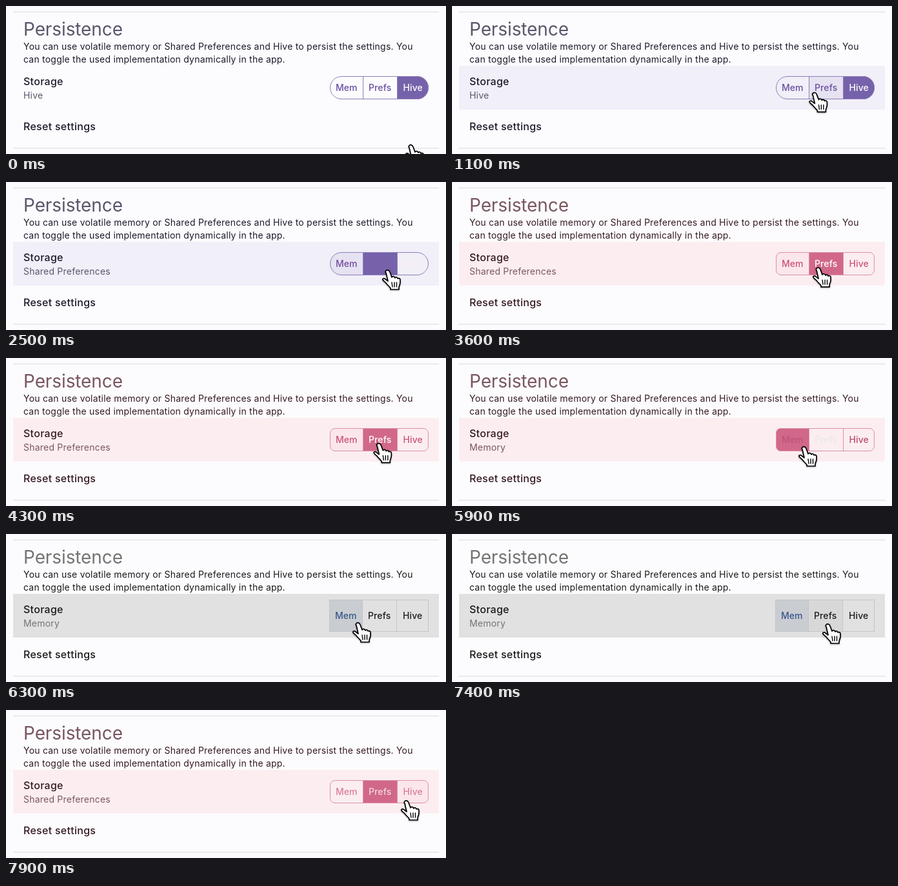
An HTML page for the animation above (8 s loop, 682 by 230 pixels).

```html
<!DOCTYPE html>
<html lang="en">
<head>
<meta charset="utf-8">
<title>Persistence</title>
<style>
  html, body { margin: 0; width: 100%; height: 100%; overflow: hidden; background: #fcfcfe; }
  svg { display: block; font-family: Inter, sans-serif; }
  .head { font-size: 28px; letter-spacing: -.1px; fill: var(--muted); }
  .body { font-size: 14px; letter-spacing: .22px; fill: var(--text); }
  .sub { fill: var(--muted); }
  .title { font-size: 16px; font-weight: 500; letter-spacing: .28px; fill: var(--text); }
  .label { font-size: 14px; font-weight: 500; letter-spacing: .1px; text-anchor: middle; }
  .rule { fill: #e5e4ea; }
  .tile { fill: var(--tile); }
  .line { fill: none; stroke: var(--border); }
  #cursor { filter: drop-shadow(0 1px 1px rgba(0, 0, 0, .35)); }
</style>
</head>
<body>
<svg width="682" height="230" viewBox="0 0 682 230">
  <defs><clipPath id="clip"><rect id="clipBox"/></clipPath></defs>
  <rect class="rule" x="11" y="8.5" width="660" height="1.5"/>
  <rect class="rule" x="11" y="220.3" width="660" height="1.5"/>
  <rect id="storageTile" class="tile" x="11" y="93" width="660" height="68"/>
  <rect id="resetTile" class="tile" x="11" y="161" width="660" height="52"/>
  <text class="head" x="27" y="46">Persistence</text>
  <text class="body" x="27" y="68">You can use volatile memory or Shared Preferences and Hive to persist the settings. You</text>
  <text class="body" x="27" y="88">can toggle the used implementation dynamically in the app.</text>
  <text class="title" x="27" y="123">Storage</text>
  <text id="storage" class="body sub" x="27" y="144"></text>
  <text class="title" x="27" y="193">Reset settings</text>
  <g clip-path="url(#clip)">
    <rect class="seg"/><rect class="seg"/><rect class="seg"/>
  </g>
  <rect id="outline" class="line"/>
  <path id="dividers" class="line"/>
  <g id="labels">
    <text class="label" y="132">Mem</text>
    <text class="label" y="132">Prefs</text>
    <text class="label" y="132">Hive</text>
  </g>
  <g id="cursor" stroke="#000" stroke-width="1.7" stroke-linejoin="round" stroke-linecap="round">
    <path fill="#fff" d="M7 3C9 1 12 2 13 5L16 13C17 11 20 11 21 14C22 12 25 13 25 15C27 14 29 15 29 17V21C29 25 27 27 27 29V32H14V30C12 27 9 25 7 22C5 20 3 19 2 17C1 15 4 14 6 16L10 19L7 6C6 5 6 4 7 3Z"/>
    <path fill="none" stroke-width="1.4" d="M16 21L17 28M20 21V28M23.5 21V28"/>
  </g>
</svg>
<script>
const $ = id => document.getElementById(id);
const segs = [...document.querySelectorAll('.seg')];
const labels = [...document.querySelectorAll('.label')];

const themes = {
  purple: { text: '#1d1a2b', muted: '#5c566b', tile: '#f1eff8', border: '#8d7cba', fill: '#7662aa',
    ink: '#6a4fa2', on: '#ffffff', hover: '#e6e2f1', left: 502, top: 109, radius: 18 },
  pink: { text: '#351a21', muted: '#7a5660', tile: '#fceef0', border: '#db8fa6', fill: '#d1688a',
    ink: '#cb5378', on: '#ffffff', hover: '#fbe7eb', left: 502, top: 109, radius: 8 },
  grey: { text: '#1a1a1a', muted: '#747474', tile: '#e1e1e1', border: '#c3c5c8', fill: '#c9ccd1',
    ink: '#1c1c1c', on: '#38588c', hover: '#d8d8d8', left: 501, top: 102, radius: 0 },
};
const states = [
  { at: -9999, theme: 'purple', pick: 2, name: 'Hive' },
  { at: 2500, theme: 'pink', pick: 1, name: 'Shared Preferences', focus: 0 },
  { at: 5900, theme: 'grey', pick: 0, name: 'Memory' },
  { at: 7600, theme: 'pink', pick: 1, name: 'Shared Preferences' },
];
const home = { x: 618, y: 214 };
const moves = [
  { from: 0, to: 800, x: 610, y: 140 },
  { from: 900, to: 1300, x: 540, y: 131 },
  { from: 1500, to: 1800, x: 582, y: 135 },
  { from: 3500, to: 4000, x: 526, y: 126 },
  { from: 4200, to: 4700, x: 625, y: 137 },
  { from: 5000, to: 5400, x: 546, y: 132 },
  { from: 5400, to: 5700, x: 536, y: 136 },
  { from: 7000, to: 7400, x: 573, y: 138 },
  { from: 7500, to: 7900, x: 611, y: 139 },
];

const clamp = v => Math.max(0, Math.min(1, v));
const lerp = (a, b, p) => a + (b - a) * p;
const easeOut = p => 1 - (1 - p) ** 2.5;
const channels = hex => [1, 3, 5].map(i => parseInt(hex.slice(i, i + 2), 16));
const mix = (a, b, p) => {
  if (typeof a === 'number') return lerp(a, b, p);
  const end = channels(b);
  return `rgb(${channels(a).map((v, i) => Math.round(lerp(v, end[i], p)))})`;
};
const set = (el, attrs) => { for (const k in attrs) el.setAttribute(k, attrs[k]); };
const labelColor = (state, i) => themes[state.theme][i === state.pick ? 'on' : 'ink'];

const cursorAt = t => moves.reduce((pos, move) => {
  const p = easeOut(clamp((t - move.from) / (move.to - move.from)));
  return { x: lerp(pos.x, move.x, p), y: lerp(pos.y, move.y, p) };
}, home);

function draw(t) {
  const index = states.filter(s => s.at <= t).length - 1;
  const now = states[index], before = states[Math.max(0, index - 1)];
  const age = t - now.at;
  const look = {};
  for (const key in themes.pink)
    look[key] = mix(themes[before.theme][key], themes[now.theme][key], clamp(age / 200));
  for (const key of ['text', 'muted', 'tile', 'border'])
    document.documentElement.style.setProperty('--' + key, look[key]);

  const cursor = cursorAt(t);
  const tipX = cursor.x + 10, tipY = cursor.y + 2;
  set($('cursor'), { transform: `translate(${cursor.x} ${cursor.y})` });
  set($('storageTile'), { opacity: +(tipY < 161) });
  set($('resetTile'), { opacity: +(tipY >= 161 && tipY < 213) });
  $('storage').textContent = now.name;

  const { left, top, radius } = look;
  const right = 655, height = 254 - 2 * top;
  const edges = [left, left + 51, left + 104, right];
  set($('clipBox'), { x: left, y: top, width: right - left, height, rx: radius });
  set($('outline'), { x: left + .5, y: top + .5, width: right - left - 1, height: height - 1, rx: Math.max(0, radius - .5) });
  set($('dividers'), { d: `M${edges[1] + .5} ${top}v${height}M${edges[2] + .5} ${top}v${height}` });

  const inRow = tipY > top && tipY < top + height;
  segs.forEach((seg, i) => {
    const hovered = inRow && tipX >= edges[i] && tipX < edges[i + 1];
    const fill = i === now.pick ? look.fill : hovered || i === now.focus ? look.hover : 'none';
    set(seg, { x: edges[i], y: top, width: edges[i + 1] - edges[i] + 1, height, fill });
  });
  labels.forEach((label, i) => set(label, {
    x: (edges[i] + edges[i + 1] + .5) / 2,
    fill: mix(labelColor(before, i), labelColor(now, i), clamp((age + 20) / 200)),
  }));
  // Labels dip in strength while the selection settles.
  set($('labels'), { opacity: 1 - .4 * Math.sin(Math.PI * clamp(age / 400)) });
}

function tick() {
  draw(Math.floor(performance.now() % 8000 / 100) * 100);
  requestAnimationFrame(tick);
}
tick();
</script>
</body>
</html>
```
